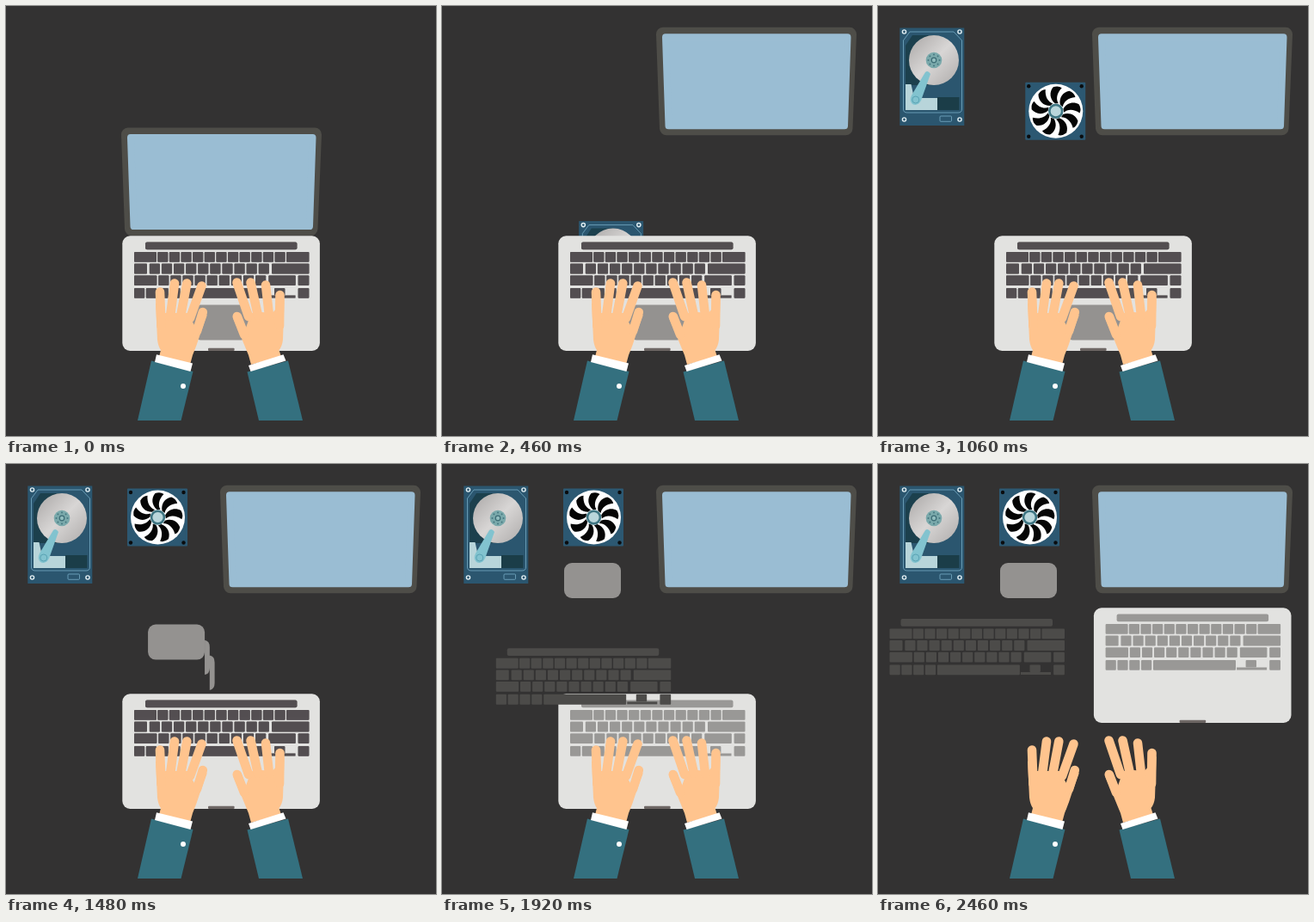
An HTML page that plays this animation: 500 by 500 pixels, repeating every 2680 ms.

```html
<!DOCTYPE html>
<html>
<head>
<meta charset="utf-8">
<style>
  html, body { margin: 0; width: 100%; height: 100%; overflow: hidden; background: #333232; }
  svg { display: block; width: 100%; height: 100%; }
</style>
</head>
<body>
<svg id="stage" viewBox="0 0 500 500"></svg>
<script>
const LOOP = 2680, STEP = 20;
const rect = (x, y, w, h, extra = '') => `<rect x="${x}" y="${y}" width="${w}" height="${h}" ${extra}/>`;
const dot = (x, y, r, fill, extra = '') => `<circle cx="${x}" cy="${y}" r="${r}" fill="${fill}" ${extra}/>`;
const path = (d, fill, extra = '') => `<path d="${d}" fill="${fill}" ${extra}/>`;
const repeat = (n, draw) => Array.from({ length: n }, (_, i) => draw(i)).join('');
const corners = (x1, y1, x2, y2, draw) => draw(x1, y1) + draw(x2, y1) + draw(x1, y2) + draw(x2, y2);

function keyboard() {
  const key = (x, y, w, h = 11.8) => rect(x, y, w, h, 'rx="1"');
  const row = (n, x, y, pitch) => repeat(n, i => key(x + i * pitch, y, 12.2));
  return rect(162, 274.5, 176.5, 8.7, 'rx="2"') +
    key(149, 286, 26) + row(11, 176.2, 286, 13.63) + key(326, 286, 26.5) +
    key(149, 299.6, 15) + row(10, 166.8, 299.6, 14.1) + key(309, 299.6, 43.5) +
    key(149, 313.2, 26.4) + row(9, 177.2, 313.2, 14.1) + key(305.3, 313.2, 31.5) + key(339.6, 313.2, 12.8) +
    row(4, 149, 328, 13.8) + key(204.4, 328, 96) + key(339.6, 328, 12.8) +
    key(312, 328, 12.4, 8.5) + rect(301.5, 336.5, 35, 3);
}

const screen = () =>
  path('M142 149.5H359L354.5 259H146Z', '#4e4d48', 'stroke="#4e4d48" stroke-width="16" stroke-linejoin="round"') +
  path('M145 153H356.5L353 256H148.5Z', '#9abdd3', 'stroke="#9abdd3" stroke-width="8" stroke-linejoin="round"');

const drive = () =>
  rect(25.3, 25.5, 75, 113.5, 'fill="#2b566f"') +
  path('M32 46L40 34H66V92H32Z', '#1c404d') +
  rect(69, 106, 25.5, 15, 'fill="#1b3d48"') +
  path('M29.5 40L37 30H88L97.5 40V120Q97.5 124 93 124H34Q29.5 124 29.5 120Z', 'none', 'stroke="#6fa3bd" stroke-width=".9"') +
  corners(30.5, 30, 95, 132, (x, y) => dot(x, y, 2.1, '#2b566f', 'stroke="#e4f0f4" stroke-width="1.4"')) +
  dot(65, 63, 29, 'url(#metal)') +
  dot(65, 63, 9.3, '#7aa9ab') +
  repeat(8, i => dot(65, 56.5, 1, '#45777f', `transform="rotate(${i * 45} 65 63)"`)) +
  dot(65, 63, 2.8, '#8fbcbd', 'stroke="#3c6b74" stroke-width="1.2"') +
  path('M32 91H38.5L42 107H69V121H32Z', '#b8d5da') +
  path('M55 77Q58 74 61 79L50 110Q46 117 40 114Q36 110 39 104Z', '#82c3cf') +
  dot(43.8, 109, 4, '#82c3cf', 'stroke="#5aa3b4"') +
  rect(72, 128, 13.5, 6.3, 'rx="1" fill="none" stroke="#6fa3bd" stroke-width=".9"');

const fan = () =>
  rect(141, 28.5, 70, 67, 'rx="1" fill="#2c5872"') +
  corners(145, 33, 206.5, 91.5, (x, y) => dot(x, y, 2.2, '#0a0c0e')) +
  dot(176.5, 62, 31.5, '#fff') +
  repeat(9, i => path('M-1 -9C-7 -14 -8 -22 -3 -28Q3 -30 7 -27C1 -21 0 -14 3 -9Z', '#050505',
    `transform="translate(176.5 62) rotate(${i * 40})"`)) +
  dot(176.5, 62, 7.4, '#b9d6db', 'stroke="#3f7683" stroke-width="2.6"');

const base = () =>
  rect(135.3, 267.3, 229.6, 133.6, 'rx="9" fill="#e2e2e0"') +
  rect(235, 397.8, 30.6, 3.1, 'rx="1" fill="#6d6664"') +
  '<use href="#keys" fill="#999896"/>';

const hand = (fingers, palm, cuff, sleeve) =>
  path(sleeve, '#34707f') +
  path(palm, '#ffc48e') + path(fingers, 'none', 'stroke="#ffc48e" stroke-width="10.6" stroke-linecap="round"') +
  path(cuff, '#fff');

const hands = () =>
  hand('M179 332.5L180.5 372M196 322.5L191 361M210.3 322.5L203 361M227.5 325.5L214 363M228.8 356L222 378',
    'M174 345L176 388Q177 396 180 400L178 408L214 417L217 406Q222 394 225 384L234 359L219 371L211 357L198 357L185 357Z',
    'M175 405.3L217 415.5L214.5 425L173 414Z',
    'M169 412.5L217.5 425L203.5 482H153Z') +
  dot(206, 442, 3, '#fff') +
  hand('M318.5 336L318 372M302 324.5L306 360M284.5 321.5L293 360M268.5 321.5L282 361M268.8 361L277 382',
    'M323.6 340L322 388Q321 396 317.5 400L320 408L285 417L282 406Q277 394 273 384L264 363L279 374L285 357L297 356L310 357Z',
    'M282 418L322.5 405.3L325.5 412.5L284.5 425Z',
    'M280.5 425.5L328 412.5L345 482H294Z');

const part = (id, content) => `<g id="${id}">${content}</g>`;
const stage = document.getElementById('stage');
stage.innerHTML = `<defs>
    <linearGradient id="metal" x1="0" y1="0" x2="1" y2="1">
      <stop offset="0" stop-color="#a9a6a5"/><stop offset=".5" stop-color="#d8d6d5"/><stop offset="1" stop-color="#aeabaa"/>
    </linearGradient>
    <g id="keys">${keyboard()}</g>
  </defs>` +
  part('drive', drive()) + part('fan', fan()) + part('base', base()) + part('screen', screen()) +
  part('board', '<use href="#keys"/>') +
  path('', '#949290', 'id="trail"') +
  part('pad', rect(217, 347.5, 66, 41, 'rx="9" fill="#949290"')) + hands();

// Each part travels in a straight line: start time, duration, offset before, offset after
const moves = {
  screen: [0, 240, [0, 0], [115, -116.7]],
  drive: [440, 240, [146, 245], [0, 0]],
  fan: [880, 240, [121, 241], [0, 0]],
  pad: [1300, 260, [0, 0], [-75, -232.5]],
  board: [1780, 220, [0, 0], [-135.5, -94.5]],
  base: [2220, 240, [0, 0], [115.6, -100]]
};
const nodes = Object.fromEntries([...Object.keys(moves), 'trail'].map(id => [id, document.getElementById(id)]));

function offset(id, t) {
  const [start, duration, from, to] = moves[id];
  const p = Math.min(1, Math.max(0, (t - start) / duration));
  return from.map((v, i) => v + (to[i] - v) * p);
}

// Right-hand slivers the pad leaves behind once it is clear of the base
function trail(now) {
  let d = '';
  if (now < 1560) for (let t = 1440; t < now; t += STEP) {
    const [dx, dy] = offset('pad', t);
    d += `M${277.2 + dx} ${347.8 + dy}q5.8 1 5.8 8.2v24q0 7.2 -5.8 8.2z`;
  }
  return d;
}

function frame(now) {
  const t = Math.floor(now % LOOP / STEP) * STEP;
  for (const id in moves) nodes[id].setAttribute('transform', `translate(${offset(id, t)})`);
  nodes.board.setAttribute('fill', t < 1780 ? '#534e51' : '#4c4b49');
  nodes.trail.setAttribute('d', trail(t));
}

let origin;
function tick(now) {
  origin ??= now;
  frame(now - origin);
  requestAnimationFrame(tick);
}
frame(0);
requestAnimationFrame(tick);
</script>
</body>
</html>
```
